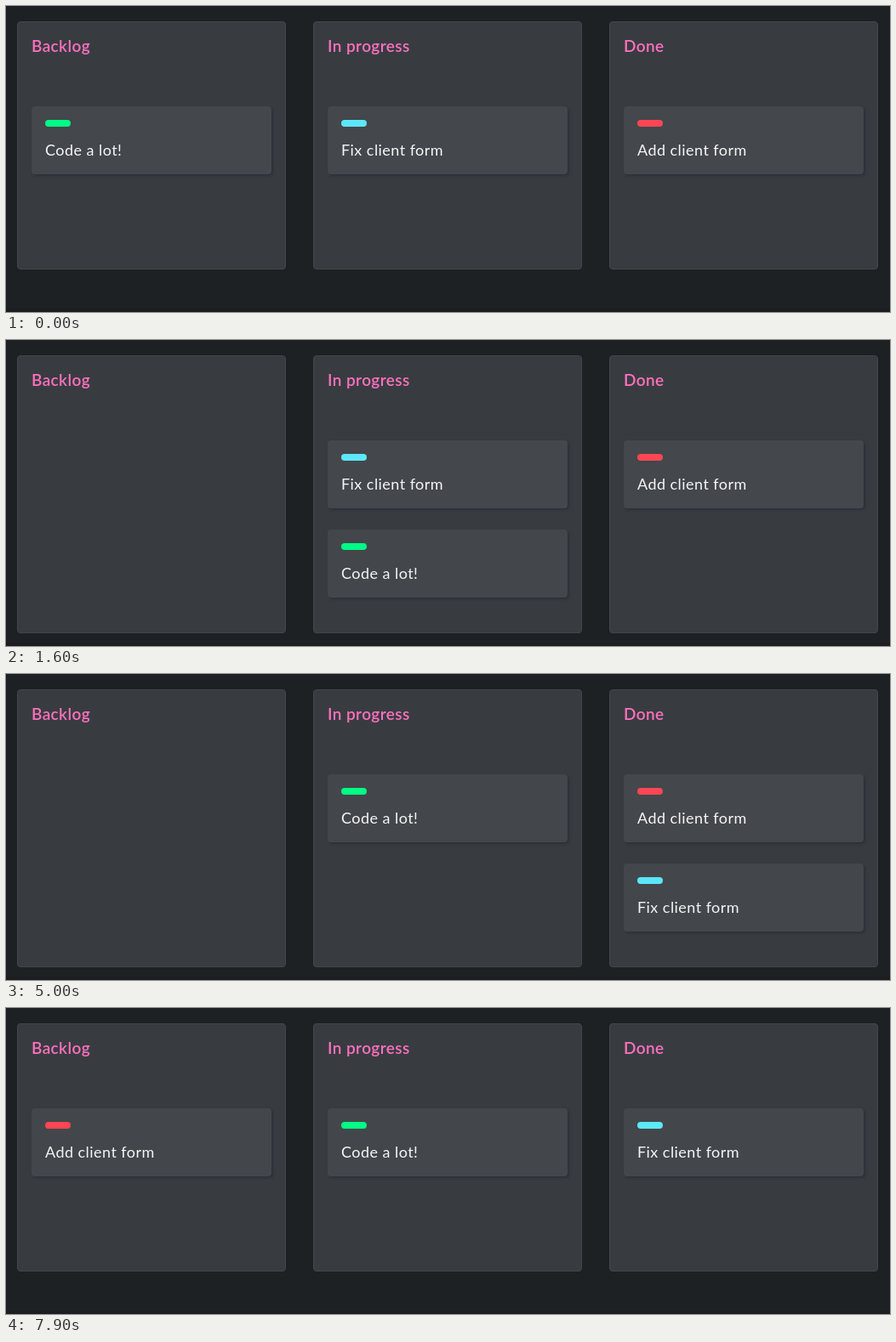
Recreate the animation shown at these times as an HTML page. Size 1039 px wide and 360 px high, loop 8000 ms.

```html
<!DOCTYPE html>
<html lang="en">
<head>
<meta charset="utf-8">
<title>Task board</title>
<style>
  html, body { margin: 0; width: 100%; height: 100%; overflow: hidden; background: #1e2124; }
  body { position: relative; font-family: Lato, "Open Sans", sans-serif; }
  div { position: absolute; box-sizing: border-box; white-space: nowrap; }
  .floor { left: 0; right: 0; top: 356px; height: 4px; background: #1b1d20; }
  .col { top: 18px; width: 316px; background: #383c40; border: 1px solid #42464a; border-radius: 4px; }
  .title { left: 16px; top: 18px; font: 600 19px/20px Lato, "Open Sans", sans-serif; letter-spacing: .4px; color: #ff70bf; }
  .zone { left: 0; top: 58px; width: 314px; }
  .card { left: 0; top: 0; width: 282px; height: 80px; border-radius: 4px; transform-origin: 0 0;
    background: rgba(255, 255, 255, .06); box-shadow: 2px 2px 3px rgba(38, 40, 56, .6); }
  .ghost { box-shadow: none; }
  .chip { left: 16px; top: 16px; width: 30px; height: 8px; border-radius: 4px; }
  .text { left: 16px; top: 41px; font-size: 18px; line-height: 20px; letter-spacing: .45px; color: #f5f6f7; }
</style>
</head>
<body>
<div class="floor"></div>
<script>
const LOOP = 8000, STEP = 100, FADE = 500;
const NEUTRAL = [61, 60, 64], HOT = [52, 71, 64];
const TITLES = ['Backlog', 'In progress', 'Done'];
const TASKS = [['Code a lot!', '#00fb85'], ['Fix client form', '#5ce8fa'], ['Add client form', '#ff4655']];

// stops: [time, column under the pointer], -1 between columns
const DRAGS = [
  { task: 0, start: 500, end: 1100, drop: 1200, from: [76, 128], to: [360, 193],
    stops: [[500, 0], [600, -1], [700, 1]] },
  { task: 1, start: 3700, end: 4300, drop: 4600, from: [424, 129], to: [677, 206],
    stops: [[3700, 1], [3900, 2]] },
  { task: 2, start: 6900, end: 7200, drop: 7500, from: [670, 118], to: [-22, 118],
    stops: [[6900, 2], [7000, 1], [7100, 0]] }
];

function add(parent, cls, text = '') {
  const el = document.createElement('div');
  el.className = cls;
  el.textContent = text;
  return parent.appendChild(el);
}

function makeCard(cls) {
  const el = add(document.body, cls);
  return { el, chip: add(el, 'chip'), text: add(el, 'text') };
}

function fill(card, [text, color]) {
  card.text.textContent = text;
  card.chip.style.background = color;
}

const colX = i => 13 + 348 * i;
const clamp = x => Math.max(0, Math.min(1, x));
const easeOut = x => 1 - (1 - clamp(x)) ** 2;
const mix = (a, b, k) => a + (b - a) * k;
// progress of a style transition, sampled slightly after it began
const fade = ms => ms < 0 ? 0 : easeOut((ms + 40) / FADE);

const cols = TITLES.map((title, i) => {
  const el = add(document.body, 'col');
  el.style.left = colX(i) + 'px';
  const zone = add(el, 'zone');
  add(el, 'title', title);
  return { el, zone };
});
const cards = TASKS.map(task => {
  const card = makeCard('card');
  fill(card, task);
  return card;
});
const ghost = makeCard('card ghost');

function place(el, x, y, opacity, scale = 1) {
  el.style.transform = `translate(${x}px, ${y}px) scale(${scale})`;
  el.style.opacity = opacity;
}

function layout(t) {
  const lists = [[0], [1], [2]];
  for (const { task, stops } of DRAGS)
    for (const [time, col] of stops) {
      if (t < time || col < 0) continue;
      for (const list of lists) {
        const at = list.indexOf(task);
        if (at >= 0) list.splice(at, 1);
      }
      lists[col].push(task);
    }
  return lists;
}

function heat(drag, col, t) {
  let sum = 0;
  drag.stops.forEach(([time, c], i) => {
    if (c !== col) return;
    const out = i + 1 < drag.stops.length ? drag.stops[i + 1][0] : Infinity;
    sum += fade(Math.min(t, out) - time) * (1 - fade(t - out));
  });
  return clamp(sum);
}

function render(t) {
  const lists = layout(t);
  const drag = DRAGS.filter(d => t >= d.start).pop();
  const dropped = drag ? fade(t - drag.drop) : 1;
  const tall = lists.some(list => list.length > 1);

  cols.forEach(({ el, zone }, i) => {
    el.style.height = (tall ? 327 : 292) + 'px';
    zone.style.height = (lists[i].length > 1 ? 267 : 231) + 'px';
    zone.style.opacity = drag ? fade(t - drag.start) * (1 - dropped) : 0;
    if (drag) {
      const k = heat(drag, i, t);
      zone.style.background = `rgb(${NEUTRAL.map((v, j) => mix(v, HOT[j], k))})`;
    }
    lists[i].forEach((task, row) => {
      const opacity = drag && drag.task === task ? mix(.35, 1, dropped) : 1;
      place(cards[task].el, colX(i) + 17, 118 + 105 * row, opacity);
    });
  });

  const held = drag && t < drag.drop;
  ghost.el.style.display = held ? '' : 'none';
  if (held) {
    fill(ghost, TASKS[drag.task]);
    const k = easeOut((t - drag.start) / (drag.end - drag.start));
    const grow = clamp((t - drag.start) / 250);
    const [x, y] = drag.from.map((v, j) => mix(v, drag.to[j], k));
    place(ghost.el, Math.round(x), Math.round(y), mix(.22, .78, grow), mix(.96, 1, grow));
  }
}

const begin = performance.now();
function tick() {
  const t = (performance.now() - begin) % LOOP;
  render(Math.floor(t / STEP) * STEP);
  requestAnimationFrame(tick);
}
tick();
</script>
</body>
</html>
```
